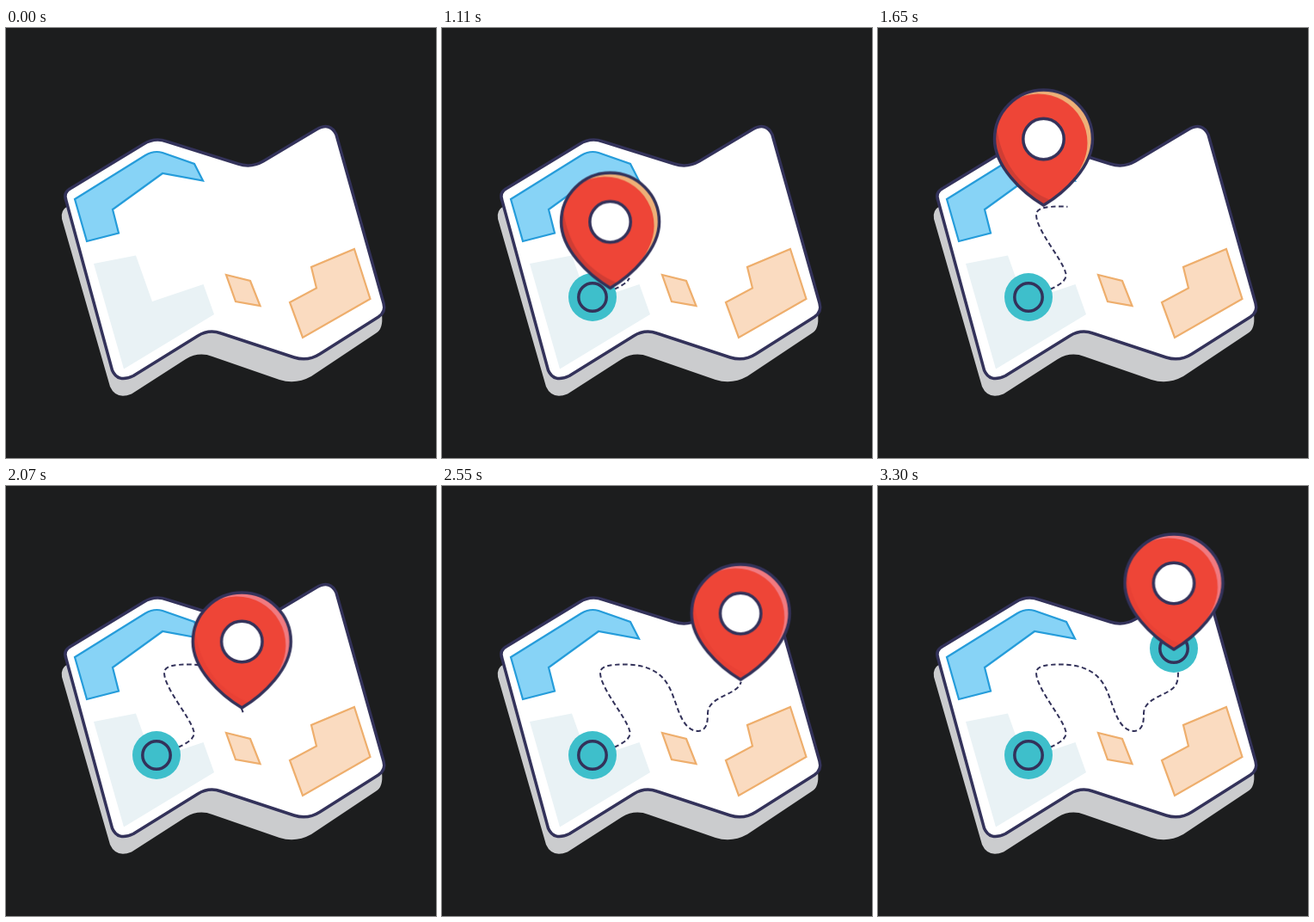
Animation of 500 by 500 pixels, one loop 4.53 s. Source, as an HTML page:

```html
<!DOCTYPE html>
<html lang="en">
<head>
<meta charset="utf-8">
<title>Map route</title>
<style>
  html, body { margin: 0; width: 100%; height: 100%; overflow: hidden; background: #1c1d1e; }
  svg { display: block; width: 100vw; height: 100vh; }

  .line { fill: none; stroke: #33325a; stroke-width: 3.5; stroke-linejoin: round; }
  .blue { fill: #87d3f6; stroke: #259cda; stroke-width: 2.2; }
  .peach { fill: #fadbc0; stroke: #eeae6c; stroke-width: 2.2; }
  .dashes { fill: none; stroke: #33325a; stroke-width: 2; stroke-dasharray: 5.5 3.5; }

  .stop, .pop, .travel, .reveal, .shine, .shade {
    animation: 4530ms linear infinite;
  }
  .stop { animation-name: stop-a; }
  .stop.end { animation-name: stop-b; }
  .pop { animation-name: pop; }
  .shine { animation-name: shine; animation-timing-function: step-end; }
  .shade { animation-name: shade; animation-timing-function: step-end; }
  .reveal {
    fill: none; stroke: #fff; stroke-width: 8;
    stroke-dasharray: 500; animation-name: reveal;
  }
  .travel {
    offset-path: path("M175 313Q190 308 202 303C213 298 221 292 218 284C213 267 184 235 184 217C184 209 197 207.5 212 207.5C240 207.5 258 217 267 240C274 256 279 285 298 285C308 284 309 275 309 264C310 246 336 244 345 233C349 228 349 222 349 214L344.5 193");
    offset-rotate: 0deg;
    animation-name: travel;
  }

  @keyframes stop-a {
    0%, 9.27% { transform: scale(0); animation-timing-function: ease-out; }
    14.57%, 100% { transform: scale(1); }
  }
  @keyframes stop-b {
    0%, 60.26% { transform: scale(0); animation-timing-function: ease-out; }
    65.56%, 100% { transform: scale(1); }
  }
  @keyframes pop {
    0%, 15.23% { transform: scale(0); animation-timing-function: ease-out; }
    20.53%, 100% { transform: scale(1); }
  }
  @keyframes travel {
    0%, 22.19% { offset-distance: 0px; }
    24.5% { offset-distance: 22px; }
    36.42% { offset-distance: 144.5px; }
    45.7% { offset-distance: 254.5px; }
    56.29% { offset-distance: 371.5px; }
    59.6%, 100% { offset-distance: 100%; }
  }
  @keyframes reveal {
    0%, 20.5% { stroke-dashoffset: 500; }
    22.52% { stroke-dashoffset: 471; }
    24.5% { stroke-dashoffset: 451; }
    36.42% { stroke-dashoffset: 328; }
    45.7% { stroke-dashoffset: 243; }
    56.29% { stroke-dashoffset: 128; }
    58.9%, 100% { stroke-dashoffset: 100; }
  }
  @keyframes shine {
    0% { fill: #eeb078; }
    41.06%, 100% { fill: #f17a80; }
  }
  @keyframes shade {
    0% { fill: #cf3d34; }
    41.06%, 100% { fill: #e84135; }
  }
</style>
</head>
<body>
<svg viewBox="0 0 500 500">
  <defs>
    <path id="route" d="M175 313Q190 308 202 303C213 298 221 292 218 284C213 267 184 235 184 217C184 209 197 207.5 212 207.5C240 207.5 258 217 267 240C274 256 279 285 298 285C308 284 309 275 309 264C310 246 336 244 345 233C349 228 349 222 349 214L344.5 193"/>
    <path id="drop" d="M0 0C-25 -15 -57 -45 -57 -77A57 57 0 0 1 57 -77C57 -45 25 -15 0 0Z"/>
    <g id="target">
      <circle r="28" fill="#3ebfcb"/>
      <circle class="line" r="16.2"/>
    </g>
    <clipPath id="inside"><use href="#drop"/></clipPath>
    <mask id="drawn" maskUnits="userSpaceOnUse" x="0" y="0" width="500" height="500">
      <use href="#route" class="reveal"/>
    </mask>
  </defs>

  <rect width="500" height="500" fill="#1c1d1e"/>

  <!-- map -->
  <path fill="#cbccce" d="M65 222Q63 212 72 207L420 300L437 333Q439 350 430 355L355 405Q337 415 318 409L240 382Q224 376 209 385L146 425.5Q128 432.5 121 417Z"/>
  <path class="line" style="fill:#fff" d="M70 201Q66 191 76 186L160 135Q173 127 187 132L270 158Q285 163 299 155L361 118Q377 109 384 124L439 320Q442 330 433 336L365 379Q351 388 335 383L250 355Q236 350 223 358L148 404.5Q130 413 123.5 398Z"/>
  <path class="blue" d="M80 199L162 148Q172 142 182 145L219 158L229 177.5L182 169L124 211L131 238.5L94 248Z"/>
  <path fill="#e9f2f5" d="M102 274L151 264.5L170 318L229.5 298L242 333L137 396.5Z"/>
  <path class="peach" d="M256 287L284 294L295.5 323L267 318Z"/>
  <path class="peach" d="M405 257L423.5 315L345 360L330 319L361 302.5L355 278Z"/>

  <g mask="url(#drawn)"><use href="#route" class="dashes"/></g>

  <g transform="translate(175 313)"><g class="stop"><use href="#target"/></g></g>
  <g transform="translate(344 189)"><g class="stop end"><use href="#target"/></g></g>

  <!-- pin, tip at its own origin -->
  <g class="travel"><g class="pop"><g transform="translate(-.5 -3)">
    <use href="#drop" fill="#ee4537"/>
    <g clip-path="url(#inside)">
      <path class="shade" d="M-57 -90L-57 -77C-57 -45 -25 -15 0 0L8 -6C-22 -18 -50 -45 -55 -95Z"/>
      <path class="shine" d="M-36 -121A57 57 0 0 1 57 -77C57 -52 40 -32 28 -21C42 -38 51 -55 51 -72A57 57 0 0 0 -36 -121Z"/>
    </g>
    <use href="#drop" class="line"/>
    <circle class="line" style="fill:#fff" cy="-77" r="23.7"/>
  </g></g></g>
</svg>
</body>
</html>
```
